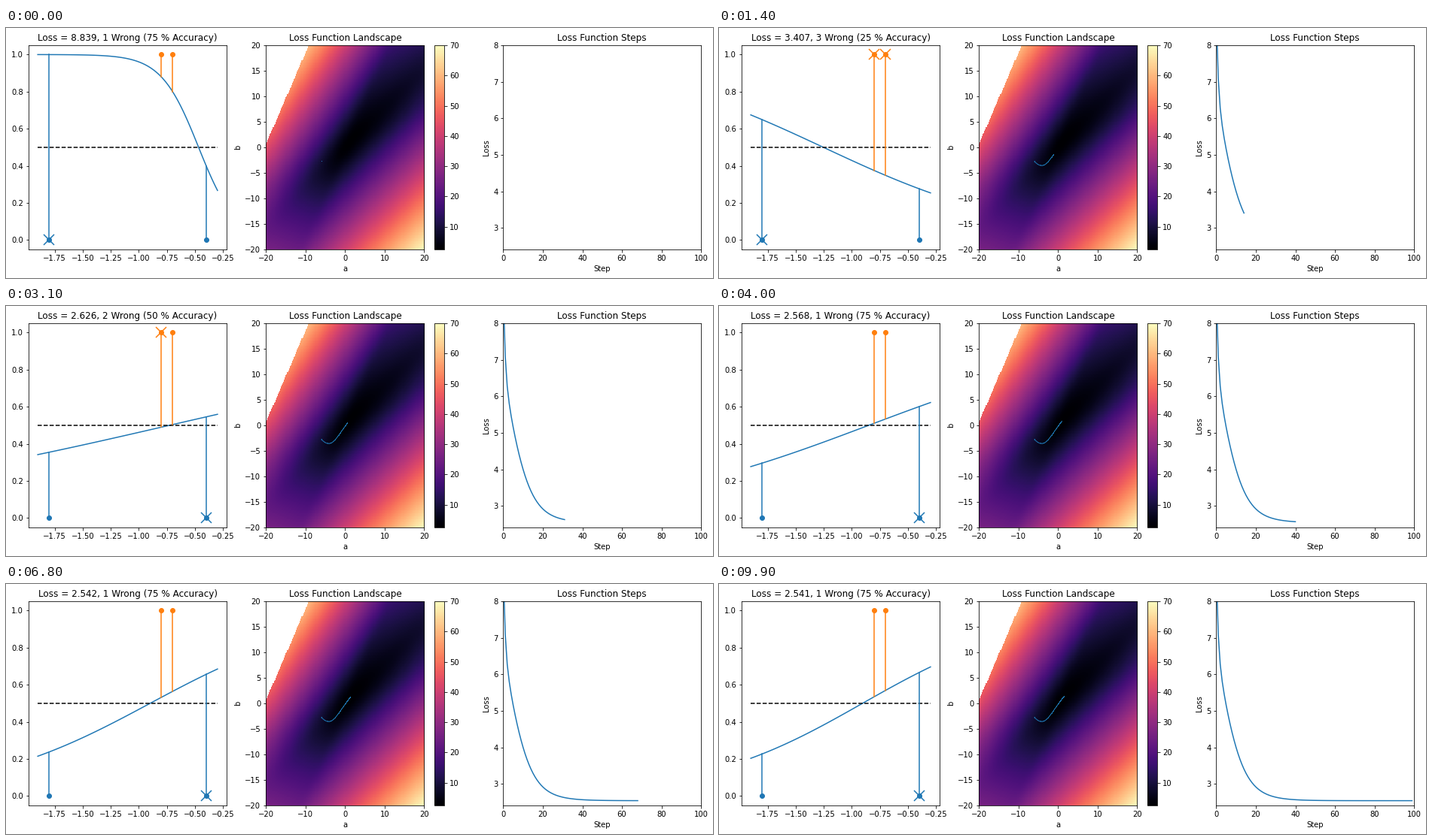
A matplotlib script that plays this animation: 939x333 px, repeating every 10000 ms.

```python
import numpy as np
import matplotlib.pyplot as plt
from matplotlib.animation import FuncAnimation

W, H, DPI = 939, 333, 72
STEPS, RATE = 100, 0.5
BLUE, ORANGE = "C0", "C1"

xs = np.array([-1.8, -0.8, -0.7, -0.4])
ys = np.array([0, 1, 1, 0])


def sigmoid(z):
    return 1 / (1 + np.exp(-z))


def loss(a, b):
    total = 0
    for x, y in zip(xs, ys):
        p = sigmoid(a * x + b)
        total = total - np.log(p if y else 1 - p)
    return total


def descend(a, b):
    path = []
    for _ in range(STEPS):
        err = sigmoid(a * xs + b) - ys
        a, b = a - RATE * (err * xs).sum(), b - RATE * err.sum()
        path.append((a, b))
    return np.array(path)


path = descend(-7.0, -2.0)
losses = np.array([loss(a, b) for a, b in path])

plt.rcParams["font.family"] = "DejaVu Sans"
fig = plt.figure(figsize=(W / DPI, H / DPI), dpi=DPI, facecolor="white")


def add_axes(left, width):
    return fig.add_axes([left / W, 38.2 / H, width / W, 271.8 / H])


fit_ax = add_axes(30.24, 262.6)
map_ax = add_axes(345.35, 210.07)
bar_ax = add_axes(568.56, 13.59)
step_ax = add_axes(660.46, 262.6)

# Fitted curve with residuals
grid = np.linspace(-1.9, -0.3, 100)
curve, = fit_ax.plot(grid, grid * 0, color=BLUE)
fit_ax.plot([-1.9, -0.3], [0.5, 0.5], "k--")
colors = [ORANGE if y else BLUE for y in ys]
stems, crosses = [], []
for x, y, c in zip(xs, ys, colors):
    stems.append(fit_ax.plot([x, x], [y, y], color=c)[0])
    fit_ax.plot([x], [y], "o", color=c, ms=6)
    crosses.append(fit_ax.plot([x], [y], "x", color=c, ms=14, mew=1.5)[0])
fit_ax.set(xlim=(-1.98, -0.22), ylim=(-0.05, 1.05))

# Loss landscape; saturated probabilities become infinite and stay blank
axis = np.linspace(-20, 20, 200)
with np.errstate(all="ignore"):
    field = loss(*np.meshgrid(axis, axis))
field = np.ma.masked_invalid(field)
image = map_ax.imshow(field, cmap="magma", origin="lower", aspect="auto",
                      extent=(-20, 20, -20, 20), interpolation="nearest",
                      vmin=losses[-1], vmax=70)
fig.colorbar(image, cax=bar_ax, ticks=range(10, 71, 10))
trail, = map_ax.plot([], [], color=BLUE, lw=1, marker=",")
map_ax.set(xlim=(-20, 20), ylim=(-20, 20), xlabel="a", ylabel="b",
           xticks=range(-20, 21, 10), yticks=range(-20, 21, 5),
           title="Loss Function Landscape")

# Loss history
history, = step_ax.plot([], [], color=BLUE)
step_ax.set(xlim=(0, 100), ylim=(losses[-1] * 0.95, 8), xlabel="Step",
            ylabel="Loss", title="Loss Function Steps")


def update(i):
    a, b = path[i]
    probs = sigmoid(a * xs + b)
    wrong = (probs > 0.5) != (ys == 1)
    curve.set_ydata(sigmoid(a * grid + b))
    for stem, cross, y, p, bad in zip(stems, crosses, ys, probs, wrong):
        stem.set_ydata([y, p])
        cross.set_visible(bool(bad))
    n = int(wrong.sum())
    fit_ax.set_title(f"Loss = {losses[i]:.3f}, {n} Wrong "
                     f"({100 - 25 * n} % Accuracy)")
    trail.set_data(path[:i + 1, 0], path[:i + 1, 1])
    history.set_data(np.arange(i + 1), losses[:i + 1])
    return []


anim = FuncAnimation(fig, update, frames=STEPS, interval=100, repeat=True)
plt.show()
```
